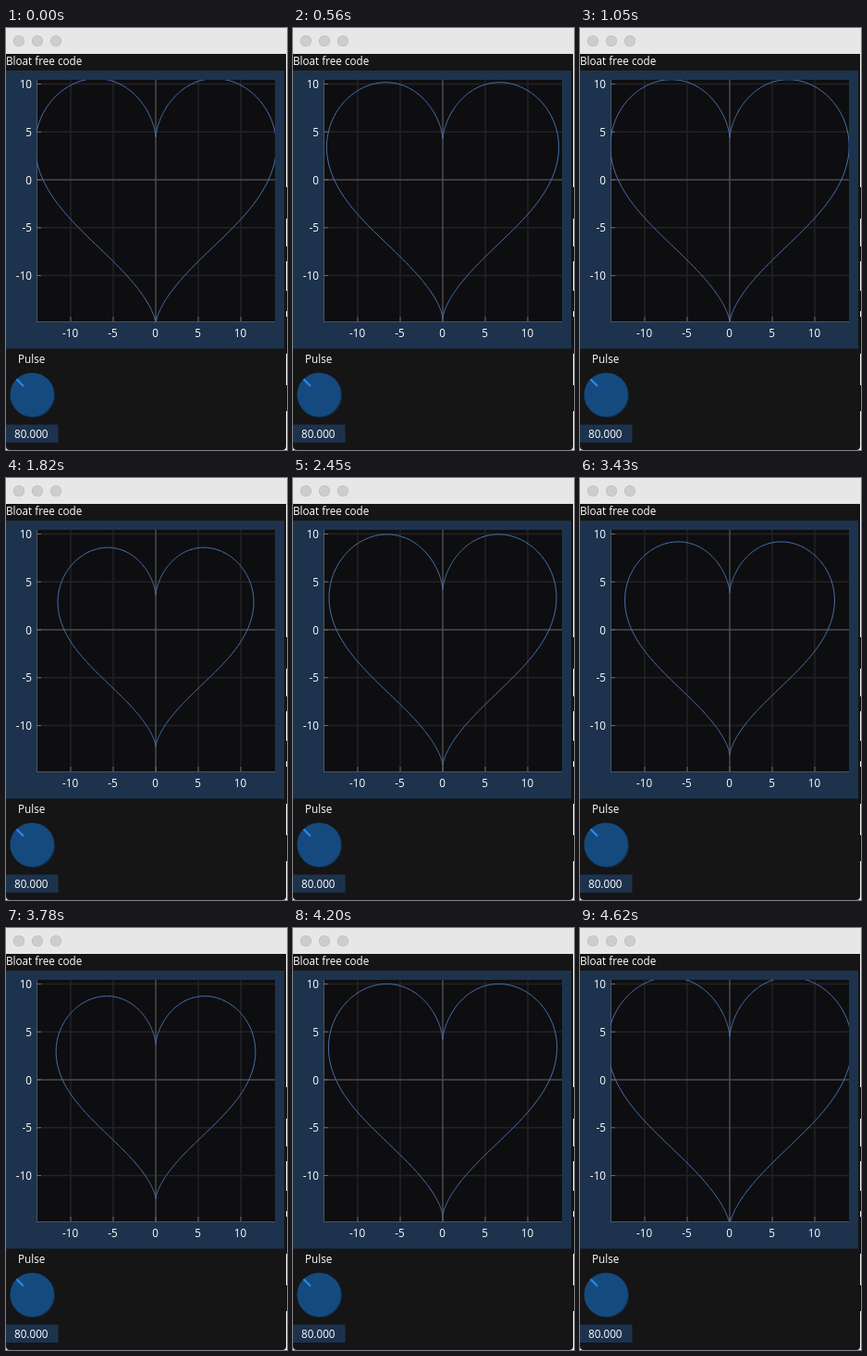
Recreate the animation shown at these times as an HTML page with a canvas. Size 304 px wide and 456 px high, loop 4.69 s.

```html
<!DOCTYPE html>
<html lang="en">
<head>
<meta charset="utf-8">
<title>Pulse</title>
<style>
  html, body { margin: 0; height: 100%; overflow: hidden; background: #151515; }
  canvas { display: block; }
</style>
</head>
<body>
<canvas id="stage" width="304" height="456"></canvas>
<script>
const ctx = document.getElementById('stage').getContext('2d');
const LOOP = 4690, STEP = 70;
const PLOT = { x: 33, y: 56, w: 258, h: 262 };
const ORIGIN = { x: 162, y: 164 };
const UNIT = { x: 9.2, y: 10.35 };
const PHASE_START = 0.5, PHASE_STEP = 80 / (2 * Math.PI) / 15;

function rect(x, y, w, h, color) {
  ctx.fillStyle = color;
  ctx.fillRect(x, y, w, h);
}

function disc(x, y, r, color) {
  ctx.beginPath();
  ctx.arc(x, y, r, 0, 2 * Math.PI);
  ctx.fillStyle = color;
  ctx.fill();
}

function text(str, x, y, align = 'left') {
  ctx.font = '11.7px "Open Sans", sans-serif';
  ctx.textAlign = align;
  ctx.fillStyle = '#fff';
  ctx.fillText(str, x, y);
}

function drawWindow() {
  // Light desktop with dark marks, showing beside the window
  rect(0, 0, 304, 456, '#f2f2f2');
  for (const [y, h] of [[172, 34], [236, 16], [284, 22], [312, 40], [386, 28]]) {
    rect(303, y, 1, h, '#0a0a0a');
  }
  ctx.beginPath();
  ctx.roundRect(0, 0, 303, 456, [0, 0, 4, 4]);
  ctx.fillStyle = '#151515';
  ctx.fill();

  rect(0, 0, 304, 28, '#e7e7e7');
  for (const x of [14, 34, 54]) {
    disc(x, 14, 6.1, '#bcbcbc');
    disc(x, 14, 5.3, '#cdcdcd');
  }
  text('Bloat free code', 0, 40);
}

function drawAxes() {
  rect(0, 46, 301, 300.5, '#1d324d');
  rect(PLOT.x, PLOT.y, PLOT.w, PLOT.h, '#0e0e10');
  const vertical = (v, color) =>
    rect(ORIGIN.x + v * UNIT.x - 0.75, PLOT.y, 1.5, PLOT.h, color);
  const horizontal = (v, color) =>
    rect(PLOT.x, ORIGIN.y - v * UNIT.y - 0.75, PLOT.w, 1.5, color);

  for (const v of [-10, -5, 5, 10]) {
    vertical(v, '#232325');
    horizontal(v, '#232325');
  }
  vertical(0, '#4c4c4e');
  horizontal(0, '#4c4c4e');
  rect(PLOT.x, PLOT.y, 1, PLOT.h, '#4c5562');
  rect(PLOT.x, PLOT.y + PLOT.h - 1, PLOT.w, 1, '#4c5562');

  for (const v of [-10, -5, 0, 5, 10]) {
    const x = ORIGIN.x + v * UNIT.x, y = ORIGIN.y - v * UNIT.y;
    rect(x - 0.5, PLOT.y + PLOT.h - 6, 1, 5, '#68686a');
    rect(PLOT.x, y - 0.5, 5, 1, '#68686a');
    text(v, x - 0.5, 333.5, 'center');
    text(v, 28, y + 4.5, 'right');
  }
}

function drawHeart(scale) {
  const { sin, cos } = Math;
  ctx.save();
  ctx.beginPath();
  ctx.rect(PLOT.x, PLOT.y, PLOT.w, PLOT.h);
  ctx.clip();
  ctx.beginPath();
  for (let a = 0; a < 2 * Math.PI; a += 0.01) {
    const x = 16 * sin(a) ** 3;
    const y = 13 * cos(a) - 5 * cos(2 * a) - 2 * cos(3 * a) - cos(4 * a);
    ctx.lineTo(ORIGIN.x + x * scale * UNIT.x, ORIGIN.y - y * scale * UNIT.y);
  }
  ctx.strokeStyle = '#4a74b4';
  ctx.lineWidth = 1;
  ctx.stroke();
  ctx.restore();
}

function drawKnob() {
  text('Pulse', 13, 362);
  disc(29, 397, 24, '#112c49');
  disc(28.2, 396.2, 23.8, '#144a7e');
  ctx.beginPath();
  ctx.moveTo(11.5, 379.5);
  ctx.lineTo(19, 387);
  ctx.strokeStyle = '#2d86ec';
  ctx.lineWidth = 2.2;
  ctx.stroke();
  rect(0, 428.5, 56.5, 19.5, '#1d324d');
  text('80.000', 9, 443);
}

function draw(now) {
  const step = Math.floor((now % LOOP) / STEP);
  drawWindow();
  drawAxes();
  drawHeart(0.801 + 0.097 * Math.cos(PHASE_START + PHASE_STEP * step));
  drawKnob();
  requestAnimationFrame(draw);
}

draw(0);
</script>
</body>
</html>
```
